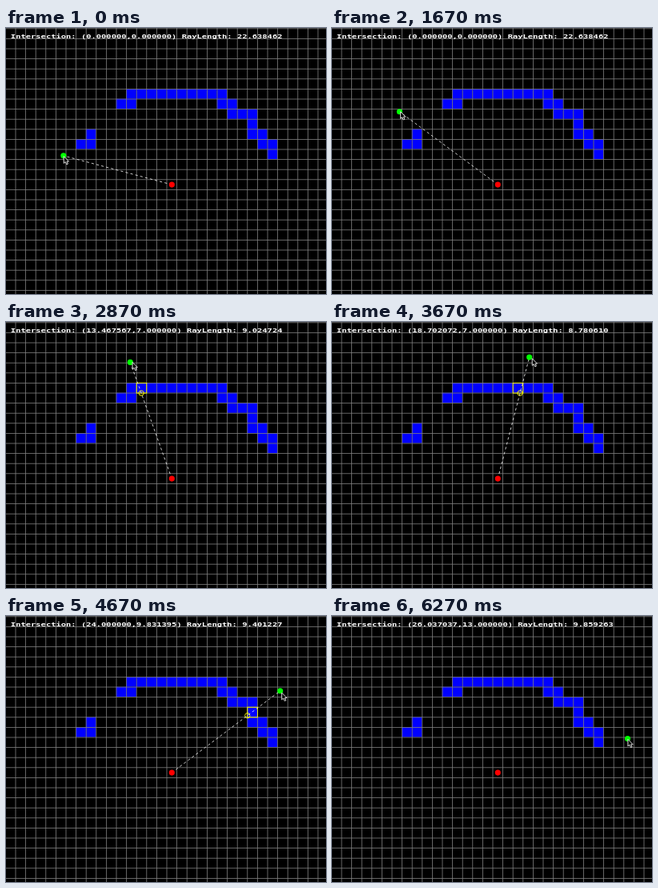
Recreate the animation shown at these times as an HTML page with a canvas. Size 400 px wide and 333 px high, loop 6.34 s.

```html
<!DOCTYPE html>
<html lang="en">
<head>
<meta charset="utf-8">
<title>Grid ray cast</title>
<style>
  html, body { margin: 0; width: 100%; height: 100%; overflow: hidden; background: #000; }
  canvas { display: block; }
</style>
</head>
<body>
<canvas width="400" height="333"></canvas>
<script>
const ctx = document.querySelector('canvas').getContext('2d');
const LOOP = 6340, FPS = 15, LAST = 94, RELEASE = 90;
const SIZE = 512, CELL = 16, SCALE = 12.6 / CELL;
const origin = { x: 264, y: 248 };

// Each wall is a walk from a start cell
const moves = { R: [1, 0], U: [0, -1], D: [0, 1] };

function walk(x, y, route) {
  const cells = [[x, y]];
  for (const m of route) {
    x += moves[m][0];
    y += moves[m][1];
    cells.push([x, y]);
  }
  return cells;
}

const walls = [
  ...walk(7, 11, 'RU'),
  ...walk(11, 7, 'RU' + 'R'.repeat(9) + 'DRDRRDDRDRD')
];
const isWall = (x, y) => walls.some(([a, b]) => a === x && b === y);

// Pointer key points: step, x, y
const path = [
  [0, 92, 202], [8, 86, 183], [15, 94, 167], [25, 108, 132], [43, 198, 63],
  [55, 314, 55], [70, 436, 118], [84, 474, 198], [RELEASE, 470, 194]
];

function slope(i, axis) {
  if (i === 0 || i === path.length - 1) return 0;
  const a = path[i - 1], b = path[i + 1];
  return (b[axis] - a[axis]) / (b[0] - a[0]);
}

function pointerAt(step) {
  const s = Math.min(step, RELEASE);
  let i = 0;
  while (i < path.length - 2 && path[i + 1][0] <= s) i++;
  const a = path[i], b = path[i + 1], span = b[0] - a[0], u = (s - a[0]) / span;
  const hermite = axis => Math.round(
    a[axis] * (1 + 2 * u) * (1 - u) ** 2 + b[axis] * u * u * (3 - 2 * u) +
    span * (slope(i, axis) * u * (1 - u) ** 2 - slope(i + 1, axis) * u * u * (1 - u)));
  return { x: hermite(1), y: hermite(2) };
}

// Walk the grid cell by cell until the ray meets a wall
function castRay(from, to) {
  const ox = from.x / CELL, oy = from.y / CELL;
  const len = Math.hypot(to.x - from.x, to.y - from.y);
  const dx = (to.x - from.x) / len, dy = (to.y - from.y) / len;
  const sx = Math.sign(dx), sy = Math.sign(dy);
  const stepX = Math.abs(1 / dx), stepY = Math.abs(1 / dy);
  let cx = Math.floor(ox), cy = Math.floor(oy), dist = 0;
  let nextX = (dx < 0 ? ox - cx : cx + 1 - ox) * stepX;
  let nextY = (dy < 0 ? oy - cy : cy + 1 - oy) * stepY;
  while (dist < 40) {
    if (nextX < nextY) { cx += sx; dist = nextX; nextX += stepX; }
    else { cy += sy; dist = nextY; nextY += stepY; }
    if (isWall(cx, cy)) return { x: ox + dx * dist, y: oy + dy * dist, cx, cy };
  }
  return null;
}

function circle(x, y, r) {
  ctx.beginPath();
  ctx.arc(x + 0.5, y + 0.5, r, 0, Math.PI * 2);
}

function dot(p, color) {
  ctx.fillStyle = color;
  circle(p.x, p.y, 4.5);
  ctx.fill();
}

function drawGrid() {
  ctx.fillStyle = '#00f';
  for (const [x, y] of walls) ctx.fillRect(x * CELL, y * CELL, CELL, CELL);
  ctx.fillStyle = '#808080';
  for (let p = 0; p < SIZE; p += CELL) {
    ctx.fillRect(p, -2, 1, SIZE);
    ctx.fillRect(0, p, SIZE, 1);
  }
}

function drawRay(p) {
  ctx.strokeStyle = '#fff';
  ctx.lineWidth = 1;
  ctx.setLineDash([4, 4]);
  ctx.beginPath();
  ctx.moveTo(origin.x + 0.5, origin.y + 0.5);
  ctx.lineTo(p.x + 0.5, p.y + 0.5);
  ctx.stroke();
  ctx.setLineDash([]);
}

function drawHit(hit) {
  ctx.strokeStyle = '#ff0';
  ctx.lineWidth = 1.2;
  ctx.strokeRect(hit.cx * CELL + 0.5, hit.cy * CELL + 0.5, CELL, CELL);
  circle(hit.x * CELL, hit.y * CELL, 4);
  ctx.stroke();
}

const arrow = new Path2D('M0 0V11L2.6 8.8L4.6 13L6.6 12L4.8 8.2H8Z');

function drawCursor(p) {
  ctx.save();
  ctx.translate(p.x + 1, p.y + 1.5);
  ctx.fillStyle = '#000';
  ctx.fill(arrow);
  ctx.lineWidth = 1.1;
  ctx.strokeStyle = '#fff';
  ctx.stroke(arrow);
  ctx.restore();
}

// Six decimals, cut off rather than rounded
const decimals = v => (Math.floor(v * 1e6 + 1e-3) / 1e6).toFixed(6);

function drawLabel(hit) {
  const { x, y } = hit || { x: 0, y: 0 };
  const length = Math.hypot(x - origin.x / CELL, y - origin.y / CELL);
  ctx.save();
  ctx.translate(8.7, 16.4);
  ctx.scale(1, 0.7); // squat console lettering
  ctx.font = 'bold 13.288px "DejaVu Sans Mono", monospace';
  ctx.fillStyle = '#fff';
  ctx.fillText(`Intersection: (${decimals(x)},${decimals(y)}) RayLength: ${decimals(length)}`, 0, 0);
  ctx.restore();
}

function draw(step) {
  const pointer = pointerAt(step), hit = castRay(origin, pointer);
  const held = step < RELEASE;
  ctx.setTransform(1, 0, 0, 1, 0, 0);
  ctx.fillStyle = '#000';
  ctx.fillRect(0, 0, 400, 333);
  ctx.setTransform(SCALE, 0, 0, SCALE, -1, 0.4);
  drawGrid();
  if (held && hit) drawHit(hit);
  if (held) drawRay(pointer);
  dot(origin, '#f00');
  dot(pointer, '#0f0');
  drawCursor(pointerAt(step + 0.4)); // the cursor runs slightly ahead of the dot
  drawLabel(hit);
}

const start = performance.now();
function tick() {
  const t = (performance.now() - start) % LOOP;
  draw(Math.min(LAST, Math.floor((t + 4) * FPS / 1000)));
  requestAnimationFrame(tick);
}
tick();
</script>
</body>
</html>
```
